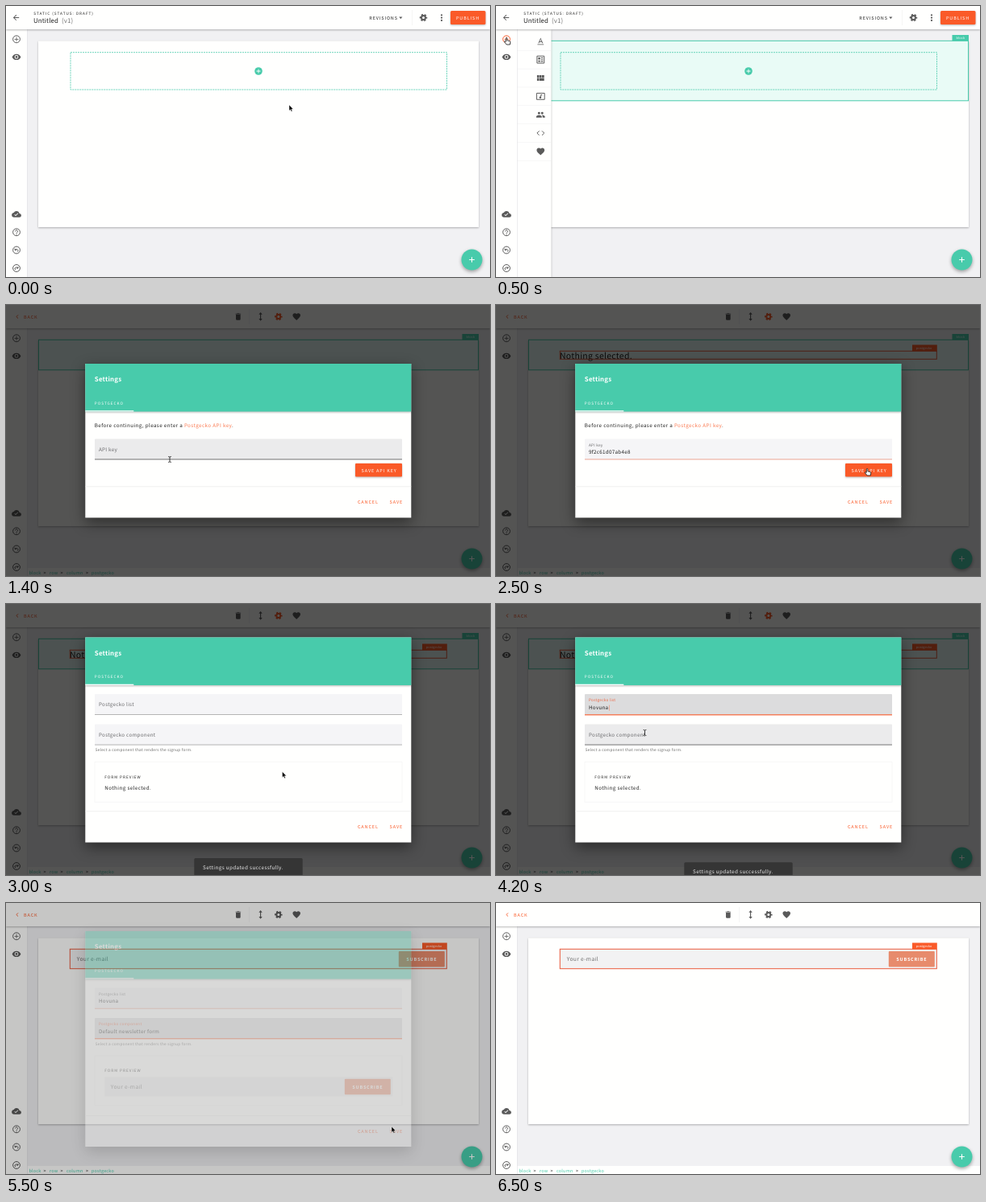
An HTML page that plays this animation: 600x337 px, repeating every 7.4 s.

```html
<!DOCTYPE html>
<html lang="en">
<head>
<meta charset="utf-8">
<title>Page editor</title>
<style>
  html, body { margin: 0; width: 100%; height: 100%; overflow: hidden; background: #f1f1f3; }
  svg { display: block; width: 100%; height: 100%; }
  text {
    font-family: "Noto Sans CJK JP", "Noto Sans CJK SC", "Noto Sans CJK KR", "Open Sans", sans-serif;
    font-size: 6.3px; letter-spacing: .26px; fill: #212121;
    white-space: pre; text-rendering: geometricPrecision;
  }
  .title { font-size: 7.88px; letter-spacing: .11px; }
  .over { font-size: 4.72px; letter-spacing: .98px; font-weight: 500; }
  .btn { font-size: 5.51px; letter-spacing: .87px; font-weight: 500; }
  .body { letter-spacing: .39px; }
  .small { font-size: 4.72px; letter-spacing: .24px; }
  .crumb { font-size: 5.51px; letter-spacing: .18px; }
  .item { font-size: 5.51px; letter-spacing: .32px; font-weight: 700; }
  .tag { font-size: 3.9px; letter-spacing: .14px; }
  .mail { font-size: 6.7px; letter-spacing: .36px; fill: #707070; }
  .bold { font-weight: 700; }
  .white { fill: #fff; }
  .orange { fill: #fa5a28; }
  .green { fill: #48cbab; }
  .icon { fill: #5a5a5a; }
  .line { fill: none; stroke: #5a5a5a; stroke-width: 2; }
  .paper { fill: #fffffe; }
  .soft { filter: drop-shadow(0 1px 1px rgba(0, 0, 0, .28)); }
  .lift { filter: drop-shadow(0 2px 2px rgba(0, 0, 0, .35)); }
  .deep { filter: drop-shadow(0 6px 9px rgba(0, 0, 0, .45)); }
</style>
</head>
<body>
<svg viewBox="0 0 600 337" preserveAspectRatio="none">
  <defs>
    <g id="plus"><path d="M-1-6H1V-1H6V1H1V6H-1V1H-6V-1H-1Z"/></g>
    <g id="gear">
      <circle r="5.2" fill="none" stroke="currentColor" stroke-width="4"/>
      <circle r="8.2" fill="none" stroke="currentColor" stroke-width="3.4" pathLength="12" stroke-dasharray="1.1 .9" stroke-dashoffset=".55"/>
    </g>
    <path id="heart" d="M0 9.4l-1.5-1.4C-6.6 3.4-10 .3-10-3.5-10-6.6-7.6-9-4.5-9c1.7 0 3.4.8 4.5 2.1C1.1-8.2 2.8-9 4.5-9 7.6-9 10-6.6 10-3.5 10 .3 6.6 3.4 1.5 8Z"/>
    <clipPath id="pill"><rect x="144" y="183" width="77" height="23" rx="11.5"/></clipPath>
  </defs>

  <rect width="600" height="337" fill="#f1f1f3"/>
  <rect class="paper soft" x="40" y="43.5" width="546" height="231.5"/>

  <g id="block">
    <rect id="blockBox" x="40.5" y="43.3" width="545" fill="#e9fbf6" stroke="#48cbab"/>
    <rect class="green" x="565.5" y="36" width="20.5" height="7.5"/>
    <text class="tag white" x="570.5" y="41.2">block</text>
  </g>
  <g id="dropZone">
    <rect x="80" y="57.7" width="466.5" height="46.3" fill="none" stroke="#48cbab" stroke-width=".8" stroke-dasharray="2 1"/>
    <circle class="green" cx="313" cy="81" r="4.8"/>
    <use href="#plus" class="white" transform="translate(313 81) scale(.42)"/>
  </g>

  <g id="element">
    <g id="elementForm"></g>
    <text id="emptyText" x="79" y="66.5" style="font-size:10.5px">Nothing selected.</text>
    <rect id="elementBox" x="79.3" y="57.3" width="467" fill="none" stroke="#e9593b"/>
    <rect class="orange" x="516" y="49.5" width="30.8" height="8"/>
    <text class="tag white" x="520.7" y="55">postgecko</text>
  </g>

  <g id="crumbs">
    <rect class="paper" x="26" y="327" width="574" height="10"/>
    <text class="crumb green" y="334.7"><tspan x="28.5">block</tspan><tspan x="54">row</tspan><tspan x="75">column</tspan><tspan x="106">postgecko</tspan></text>
    <text class="crumb" y="334.7"><tspan x="46.5">&gt;</tspan><tspan x="67.5">&gt;</tspan><tspan x="99">&gt;</tspan></text>
  </g>

  <g id="panel">
    <rect class="soft" x="110" y="29" width="143.7" height="308" fill="#f1f1f3"/>
    <text class="over" x="122.5" y="43.4">ASKGROVE</text>
    <rect class="paper" x="122.3" y="54.3" width="120.7" height="84"/>
    <circle cx="169" cy="96" r="5" fill="#262627"/>
    <text x="175.5" y="98.3">Askgrove</text>
    <text class="over" x="122.5" y="157.5">POSTGECKO</text>
    <rect x="110.5" y="163" width="143" height="62" fill="#f8f8f9"/>
    <rect class="paper" x="122.3" y="168.5" width="120.7" height="52"/>
    <rect class="green lift" x="144" y="183" width="77" height="23" rx="11.5"/>
    <use href="#plus" class="white" transform="translate(155 194.5) scale(.55)"/>
    <text class="btn white" x="166" y="196.7">CLICK TO ADD</text>
    <circle id="ripple" cx="203" cy="194" r="25" fill="#fff" opacity=".27" clip-path="url(#pill)"/>
  </g>

  <g id="menu"><rect class="paper soft" x="26" y="29" width="84.5" height="308"/><g id="rows"></g></g>

  <g>
    <rect class="paper" y="29" width="26" height="308"/>
    <rect x="26" y="29" width=".6" height="308" fill="#e2e2e4"/>
    <g id="addIcon" transform="translate(13 41.3) scale(.49)">
      <circle r="9" fill="none" stroke="currentColor" stroke-width="2"/>
      <use href="#plus" fill="currentColor" transform="scale(.85)"/>
    </g>
    <path class="icon" transform="translate(7.1 57.5) scale(.49)" d="M12 4.5C7 4.5 2.7 7.6 1 12c1.7 4.4 6 7.5 11 7.5s9.3-3.1 11-7.5c-1.7-4.4-6-7.5-11-7.5zM12 17a5 5 0 1 1 0-10 5 5 0 0 1 0 10zm0-8a3 3 0 1 0 0 6 3 3 0 0 0 0-6z"/>
    <path class="icon" transform="translate(7.1 253) scale(.49)" d="M19.4 10C18.7 6.6 15.6 4 12 4 9.1 4 6.6 5.6 5.4 8 2.3 8.4 0 10.9 0 14a6 6 0 0 0 6 6h13a5 5 0 0 0 .4-10zM10 17l-3.5-3.5 1.4-1.4 2.1 2.1L15.2 9l1.4 1.4z"/>
    <g class="line" transform="translate(13 281.3) scale(.49)"><circle r="9"/><path d="M-3-2a3 3 0 1 1 4.5 2.6Q0 1.6 0 3M0 4.5v2"/></g>
    <g class="line" transform="translate(13 303.5) scale(.49)"><circle r="9"/><path d="M-4-4V0H0M-4 0Q1-5 4 0 5 3 2 4"/></g>
    <g class="line" transform="translate(13 326) scale(-.49 .49)"><circle r="9"/><path d="M-4-4V0H0M-4 0Q1-5 4 0 5 3 2 4"/></g>
  </g>

  <rect class="paper soft" width="600" height="29"/>
  <g id="pageBar">
    <path class="icon" transform="translate(7 8.9) scale(.46)" d="M20 11H7.8l5.6-5.6L12 4l-8 8 8 8 1.4-1.4L7.8 13H20z"/>
    <text class="over" x="34.3" y="11.2">STATIC (STATUS: DRAFT)</text>
    <text class="title" x="34" y="21.4">Untitled</text>
    <text class="title" x="69" y="21.4" style="fill:#777">(v1)</text>
    <text class="btn" x="450.3" y="17">REVISIONS</text>
    <path class="icon" d="M487.2 13.4h4.2l-2.1 2.6z"/>
    <rect x="503" y="5" width=".6" height="19" fill="#eee"/>
    <use href="#gear" color="#5a5a5a" transform="translate(517.5 14.5) scale(.48)"/>
    <g class="icon"><circle cx="540" cy="11.3" r="1.1"/><circle cx="540" cy="14.6" r="1.1"/><circle cx="540" cy="17.9" r="1.1"/></g>
    <rect class="orange soft" x="551" y="6" width="43.5" height="17" rx="1.5"/>
    <text class="btn white" x="558" y="17">PUBLISH</text>
  </g>
  <g id="editBar">
    <path d="M15 12.4l-2.1 2.1 2.1 2.1" fill="none" stroke="#fa5a28" stroke-width=".9"/>
    <text class="btn orange" x="22" y="17">BACK</text>
    <path class="icon" transform="translate(282.2 8.8) scale(.47)" d="M6 19c0 1.1.9 2 2 2h8c1.1 0 2-.9 2-2V7H6zM19 4h-3.5l-1-1h-5l-1 1H5v2h14z"/>
    <rect x="301.5" y="5" width=".6" height="19" fill="#eee"/>
    <path class="icon" transform="translate(309.1 7.9) scale(.54)" d="M13 7h3L12 2 8 7h3v10H8l4 5 4-5h-3z"/>
    <use id="editGear" href="#gear" transform="translate(337.8 14.5) scale(.48)"/>
    <use href="#heart" class="icon" transform="translate(360.2 14.5) scale(.48)"/>
  </g>

  <circle class="green lift" cx="577.5" cy="315.5" r="13"/>
  <use href="#plus" class="white" transform="translate(577.5 315.5) scale(.55)"/>

  <rect id="scrim" width="600" height="337"/>
  <g id="dialog">
    <rect id="sheet" class="paper deep" width="404"/>
    <rect class="soft" width="404" height="59.5" fill="#48cbab"/>
    <text class="title white bold" x="11.5" y="22" style="letter-spacing:.2px">Settings</text>
    <text class="over white" x="11.5" y="50.8">POSTGECKO</text>
    <rect class="white" y="58.2" width="60" height="1.3"/>
    <g id="keyPage">
      <text class="body" x="11.5" y="79">Before continuing, please enter a <tspan class="orange" style="opacity:.8">Postgecko API key</tspan>.</text>
      <rect class="orange soft" x="334.7" y="124" width="58" height="16.5" rx="1"/>
      <text class="btn white" x="342.3" y="134.6">SAVE API KEY</text>
    </g>
    <g id="listPage">
      <text class="small" x="12.5" y="141.6" style="fill:#666">Select a component that renders the signup form.</text>
      <rect id="preview" class="paper" x="11.7" y="154.8" width="381" stroke="#f5f5f6" stroke-width=".8"/>
      <text class="over" x="24" y="175.4">FORM PREVIEW</text>
      <text id="nothing" class="body" x="24" y="189.6">Nothing selected.</text>
      <g id="previewForm"></g>
    </g>
    <g id="footer">
      <rect y="-39" width="404" height=".7" fill="#e9e9ea"/>
      <text class="btn orange" x="337.7" y="-17.3">CANCEL</text>
      <text class="btn orange" x="377.3" y="-17.3">SAVE</text>
    </g>
  </g>

  <g id="snack">
    <rect x="233.3" y="316" width="134.4" height="22" rx="1.5" fill="#353535"/>
    <text class="body" x="244" y="329.8" style="fill:#ededed">Settings updated successfully.</text>
  </g>

  <g id="cursor">
    <path id="arrow" d="M0 0V7.2l1.6-1.5 1.1 2.6 1.2-.5-1.1-2.5H5z" stroke="#fff" stroke-width=".4"/>
    <path id="hand" d="M-.7 4.4V.3a.8.8 0 0 1 1.6 0v2.6l3 .6q1 .3.9 1.4l-.5 3.1H.1L-2.5 4.7q-.5-1 .6-.9z" fill="#fff" stroke="#111" stroke-width=".8"/>
    <path id="beam" d="M-1.8-3.5Q0-3.5 0-2.5 0-3.5 1.8-3.5M0-2.5v5M-1.8 3.5Q0 3.5 0 2.5 0 3.5 1.8 3.5" fill="none" stroke="#111" stroke-width=".8"/>
  </g>
</svg>

<script>
const $ = id => document.getElementById(id);
const set = (id, attrs) => { for (const k in attrs) $(id).setAttribute(k, attrs[k]); };
const show = (id, on) => { $(id).style.display = on ? '' : 'none'; };
const LOOP = 7400, STEP = 100;
const ORANGE = '#fa5a28', GREY = '#5a5a5a';

// Menu rows
const rows = [
  ['Basic', '<path d="M-6 5L0-9 6 5H4L2.7 1.7H-2.7L-4 5zM-2-.3H2L0-5.5zM-8 7.5H8v1.8H-8z"/>'],
  ['Form', '<path fill="none" stroke="currentColor" stroke-width="2" d="M-9-9H9V9H-9z"/><path d="M-6-5.5h5v5h-5zM1-5.5h5v2H1zM1-1h5v2H1zM-6 2h5v4h-5zM1 3.5h5v2.5H1z"/>'],
  ['Layout', '<path d="M-9-7h5V-.7h-5zM-3-7h5V-.7h-5zM3-7h6V-.7H3zM-9 .7h5V7h-5zM-3 .7H9V7H-3z"/>'],
  ['Media', '<path fill="none" stroke="currentColor" stroke-width="2" d="M-10-8h20V8h-20z"/><path d="M0-5h4v2H1.7V3a2.6 2.6 0 1 1-1.7-2.4z"/>'],
  ['Social', '<path d="M4-1a3 3 0 1 0 0-6 3 3 0 0 0 0 6zM-4-1a3 3 0 1 0 0-6 3 3 0 0 0 0 6zM-4 1c-2.3 0-7 1.2-7 3.5V7H3V4.5C3 2.2-1.7 1-4 1zM4 1l-1 .1c1.2.8 2 1.9 2 3.4V7h6V4.5C11 2.2 6.3 1 4 1z"/>'],
  ['Code', '<path fill="none" stroke="currentColor" stroke-width="2" d="M-3.5-5.5L-9 0l5.5 5.5M3.5-5.5L9 0 3.5 5.5"/>'],
  ['Saved', '<use href="#heart"/>']
];
$('rows').innerHTML = rows.map(([name, art], i) => {
  const y = 43.8 + 22.85 * i;
  return `<g id="row${i}"><rect x="26.6" y="${y - 11.4}" width="83.5" height="22.8" fill="none"/>
    <rect x="26.6" y="${y + 11.2}" width="83.5" height=".5" fill="#eeeeef"/>
    <text class="item" x="33" y="${y + 2}">${name}</text>
    <g fill="currentColor" transform="translate(97.3 ${y}) scale(.49)">${art}</g></g>`;
}).join('');

// Sign-up form
const form = (x, y, w, pad) => `
  <rect x="${x}" y="${y}" width="${w}" height="24" fill="#f2f2f3"/>
  <text class="mail" x="${x + pad}" y="${y + 14.7}">Your e-mail</text>
  <rect x="${x + w - 59.5}" y="${y + 2.3}" width="57" height="19.5" rx="1" fill="#e78b6c"/>
  <text class="btn white bold" x="${x + w - 50}" y="${y + 14.3}" style="letter-spacing:.8px">SUBSCRIBE</text>`;
$('elementForm').innerHTML = form(79.3, 57.7, 467, 8.5);
$('previewForm').innerHTML = form(24, 181.4, 357, 7.5);

// Text fields
function addField(page, id, y, label) {
  $(page).insertAdjacentHTML('beforeend', `<g id="${id}" transform="translate(11.7 ${y})">
    <rect width="381" height="26" rx="1"/><rect y="25.2" width="381"/>
    <text x="5">${label}</text>
    <text x="5" y="18.6"><tspan></tspan><tspan fill="${ORANGE}">|</tspan></text></g>`);
}
addField('keyPage', 'keyField', 93.4, 'API key');
addField('listPage', 'listField', 70.6, 'Postgecko list');
addField('listPage', 'partField', 108, 'Postgecko component');

function setField(id, value, focus, hover, caret) {
  const [bg, rule, label, text] = $(id).children;
  const up = focus || value;
  bg.setAttribute('fill', focus ? '#dcdcdd' : hover ? '#ebebec' : '#f5f5f7');
  rule.setAttribute('height', focus ? 1.1 : .7);
  rule.setAttribute('fill', focus ? ORANGE : value ? '#e8866c' : hover ? '#444' : '#999');
  label.setAttribute('class', up ? 'small' : '');
  label.setAttribute('y', up ? 9.4 : 15.3);
  label.style.fill = focus ? '#ee6540' : '#6b6b6d';
  text.children[0].textContent = value;
  text.children[1].style.display = caret ? '' : 'none';
}

// Timing helpers
const part = (t, a, b) => Math.min(1, Math.max(0, (t - a) / (b - a)));
const ease = p => p * p * (3 - 2 * p);
const typed = (s, t, a, b) => s.slice(0, Math.round(s.length * part(t, a, b)));
const within = (t, a, b) => t >= a && t < b;

const path = [
  [0, 351, 123], [400, 13, 40], [700, 13, 40], [900, 42, 66], [1100, 203, 192],
  [1800, 203, 192], [2300, 460, 204], [2500, 460, 204], [3000, 342.5, 208.5],
  [3200, 342.5, 208.5], [3500, 170, 126], [4000, 170, 126], [4200, 184.5, 160],
  [4800, 184.5, 160], [5100, 446.3, 260.5], [5200, 478, 278], [5600, 478, 278], [5800, 451.3, 228.3]
];
const shapes = [
  [0, 'arrow'], [400, 'hand'], [800, 'arrow'], [900, 'hand'], [1000, 'arrow'], [1100, 'hand'],
  [1400, 'beam'], [2000, 'arrow'], [2200, 'hand'], [2600, 'arrow'], [3500, 'beam'],
  [4900, 'arrow'], [5200, 'hand'], [5500, 'arrow']
];

function drawCursor(t) {
  const i = path.findLastIndex(k => k[0] <= t);
  const a = path[i], b = path[i + 1] || a;
  const p = a === b ? 0 : ease(part(t, a[0], b[0]));
  set('cursor', { transform: `translate(${a[1] + (b[1] - a[1]) * p} ${a[2] + (b[2] - a[2]) * p})` });
  const shape = shapes.findLast(s => s[0] <= t)[1];
  for (const s of ['arrow', 'hand', 'beam']) show(s, s === shape);
  show('cursor', t < 6500);
}

function drawEditor(t) {
  const editing = t >= 1300, done = t >= 5400, filled = t >= 4700;
  show('pageBar', !editing);
  show('editBar', editing);
  show('crumbs', editing);
  show('dropZone', !editing);
  show('block', within(t, 100, 5400));
  set('blockBox', { height: editing ? 37.5 : 74.5 });
  set('editGear', { color: done ? GREY : ORANGE });
  show('element', t >= 1600);
  show('elementForm', done);
  show('emptyText', !done);
  set('elementBox', { height: done ? 24.4 : 10 });

  const form = within(t, 900, 1300);
  show('menu', within(t, 500, 1300));
  set('menu', { transform: `translate(${-84 * (1 - ease(part(t, 400, 600)))} 0)` });
  show('panel', form);
  set('panel', { transform: `translate(${-144 * (1 - ease(part(t, 800, 1000)))} 0)` });
  show('ripple', t >= 1200);
  set('addIcon', { color: within(t, 400, 1300) ? ORANGE : GREY });
  rows.forEach((_, i) => {
    const on = i === 1 && form, row = $('row' + i);
    row.setAttribute('color', on ? ORANGE : GREY);
    row.children[0].setAttribute('fill', on ? '#f2f2f3' : 'none');
    row.children[2].style.fill = on ? ORANGE : '#212121';
  });

  // Dialog
  const alpha = part(t, 1200, 1400) * (1 - part(t, 5300, 5600));
  const page = t < 2600 ? 'key' : filled ? 'form' : 'list';
  const [top, h] = { key: [73, 191.5], list: [41.5, 255], form: [35, 268] }[page];
  set('scrim', { opacity: .67 * alpha });
  set('dialog', { opacity: alpha, transform: `translate(98.3 ${top})` });
  show('dialog', alpha > 0);
  set('sheet', { height: h });
  set('footer', { transform: `translate(0 ${h})` });
  show('keyPage', page === 'key');
  show('listPage', page !== 'key');
  show('nothing', !filled);
  show('previewForm', filled);
  set('preview', { height: filled ? 62 : 50 });

  setField('keyField', typed('9f2c61d07ab4e8', t, 1500, 1900), within(t, 1500, 2400), within(t, 1400, 2000), within(t, 1500, 2400));
  const inList = within(t, 3600, 4300);
  setField('listField', typed('Hovuna', t, 3600, 4000), inList, within(t, 3500, 4100), inList);
  setField('partField', typed('Default newsletter form', t, 4300, 4600), t >= 4300, within(t, 4200, 4900), within(t, 4300, 4700));

  const out = part(t, 4000, 4400);
  set('snack', { transform: `translate(0 ${21 * (1 - ease(part(t, 2600, 2900)) + out * out)})` });
  show('snack', within(t, 2700, 4400));
}

function frame(now) {
  const t = Math.floor((now % LOOP) / STEP) * STEP;
  drawEditor(t);
  drawCursor(t);
  requestAnimationFrame(frame);
}
const start = performance.now();
const tick = now => { frameAt(Math.max(0, now - start)); requestAnimationFrame(tick); };
function frameAt(ms) {
  const t = Math.floor((ms % LOOP) / STEP) * STEP;
  drawEditor(t);
  drawCursor(t);
}
frameAt(0);
requestAnimationFrame(tick);
</script>
</body>
</html>
```
